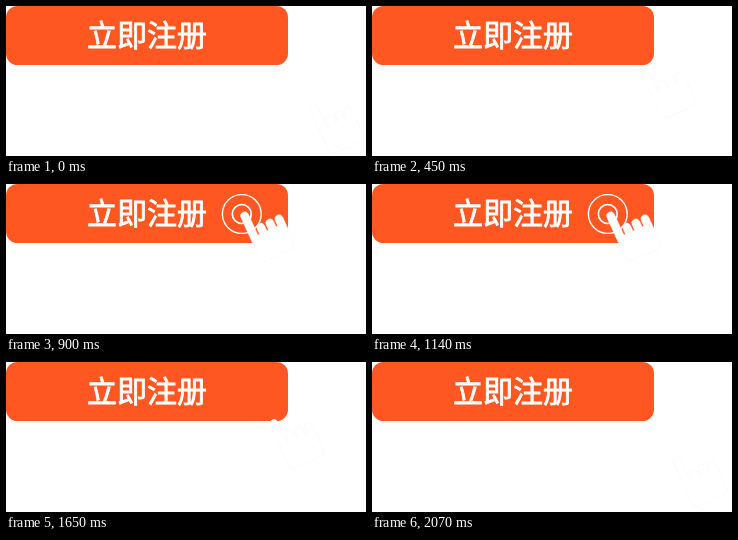
Animation of 360x150 px, one loop 2.1 s. Source, as an HTML page:

```html
<!DOCTYPE html>
<html lang="zh-CN">
<head>
<meta charset="utf-8">
<style>
html, body { margin: 0; width: 100%; height: 100%; overflow: hidden; background: #fff; }
svg { display: block; }
text {
  font: 500 30px "Noto Sans CJK SC", "Noto Sans CJK", sans-serif;
  fill: #fff; stroke: #fff; stroke-width: .8px;
}
</style>
</head>
<body>
<svg width="360" height="150" viewBox="0 0 360 150">
  <rect width="282" height="59" rx="11.5" fill="#ff5722"/>
  <text x="141" y="40" text-anchor="middle">立即注册</text>
  <g id="rings" fill="none" stroke="#fff">
    <circle r="19.4" stroke-width="1.4"/>
    <circle r="9.5" stroke-width="1.7"/>
  </g>
  <g id="hand"><path id="shape" fill="#fff" stroke="#f7f9f9" stroke-width=".6"/></g>
</svg>
<script>
const LOOP = 2100, STEP = 30;
const ARRIVE = 840, LEAVE = 1320, MOVE = 780, PULSE = 240;
const rings = document.getElementById('rings');
const hand = document.getElementById('hand');

// Upright hand: four round-tipped fingers on a palm, origin at the index fingertip.
function handPath() {
  const r = 4, gap = 2, root = 27;
  let d = `M${-r} 48V${r}`;
  for (let i = 0; i < 4; i++) {
    const x = i * (2 * r + gap), top = i ? 17 + r : r;
    if (i) d += `V${root}h${gap}V${top}`;
    d += `A${r} ${r} 0 0 1 ${x + r} ${top}`;
  }
  return d + 'V47Q34 54 27 54H3Q-4 54 -4 48Z';
}
document.getElementById('shape').setAttribute('d', handPath());

const clamp = v => Math.min(1, Math.max(0, v));

function draw(t) {
  const away = t < LEAVE
    ? 1 - clamp((t - (ARRIVE - MOVE)) / MOVE)
    : clamp((t - LEAVE) / MOVE);
  hand.setAttribute('transform',
    `translate(${237 + 69 * away} ${28.2 + 70 * away}) rotate(-24.5)`);

  const pulsing = t >= ARRIVE && t < LEAVE;
  rings.setAttribute('visibility', pulsing ? 'visible' : 'hidden');
  const phase = ((t - ARRIVE) % PULSE) / PULSE;
  const scale = 0.7 + 0.6 * (1 - Math.abs(2 * phase - 1));
  rings.setAttribute('transform', `translate(235.8 30) scale(${scale})`);
}

const start = performance.now();
function tick() {
  const t = (performance.now() - start) % LOOP;
  draw(Math.floor(t / STEP) * STEP);
  requestAnimationFrame(tick);
}
tick();
</script>
</body>
</html>
```
